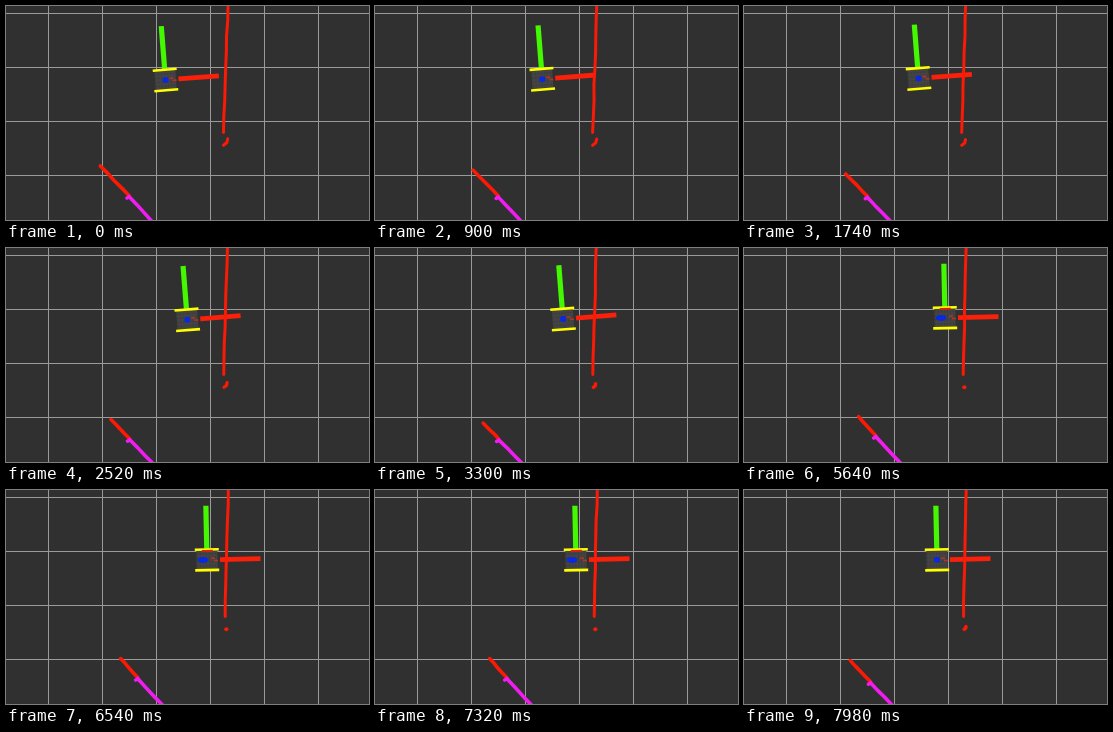
Write an HTML page that moves like this. It is 363 px wide and 214 px high and loops after 8 s.

```html
<!DOCTYPE html>
<html lang="en">
<head>
<meta charset="utf-8">
<title>Robot and laser scan</title>
<style>
html, body { margin: 0; width: 100%; height: 100%; overflow: hidden; background: #303030; }
svg { display: block; width: 100vw; height: 100vh; }
</style>
</head>
<body>
<svg viewBox="0 0 363 214" fill="none" stroke-linecap="round" stroke-linejoin="round">
  <rect width="363" height="214" fill="#303030"/>
  <path id="grid" stroke="#9a9a9a" stroke-linecap="butt" shape-rendering="crispEdges"/>
  <g id="robot" stroke-linecap="butt">
    <rect x="-10.5" y="-9.5" width="21" height="19" fill="#434343"/>
    <path d="M-10-6H10M-10-2H10M-10 2H10M-10 6H10" stroke="#343434" stroke-dasharray="1 2"/>
    <path d="M0-11V-54" stroke="#43f800" stroke-width="5.2"/>
    <path d="M13 0H53.5" stroke="#fa200a" stroke-width="4.8"/>
    <path d="M-12-10.3H12M-12 10.3H12" stroke="#ffff00" stroke-width="2.6"/>
    <path d="M4-1.5H8M7 1H11" stroke="#b03428" stroke-width="1.6"/>
    <path id="hit" d="M-5-9H6" stroke="#d82010" stroke-width="2"/>
    <ellipse id="dot" fill="#0a28e0"/>
  </g>
  <g stroke="#fa1a05">
    <path id="wall" stroke-width="3"/>
    <path id="post" stroke-width="4"/>
    <path id="near" stroke-width="3.6"/>
  </g>
  <path id="far" stroke="#f01cf0" stroke-width="3.6"/>
</svg>
<script>
const LOOP = 8000, STEP = 60;
const el = id => document.getElementById(id);
const put = (id, attrs) => { for (const k in attrs) el(id).setAttribute(k, attrs[k]); };
const ramp = (t, from, to) => Math.min(1, Math.max(0, (t - from) / (to - from)));
const ease = u => u * u * (3 - 2 * u);

function noise(n) {
  const s = Math.sin(n * 12.9898) * 43758.5453;
  return s - Math.floor(s) - 0.5;
}

// A scanned line, slightly rough across its run
function rough(x0, y0, x1, y1, seed, parts) {
  let d = `M${x0} ${y0}`;
  for (let i = 1; i < parts; i++) {
    const u = i / parts;
    d += `L${x0 + (x1 - x0) * u + noise(seed + i) * 0.8} ${y0 + (y1 - y0) * u}`;
  }
  return d + `L${x1} ${y1}`;
}

function draw(now) {
  const t = Math.floor((now % LOOP) / STEP) * STEP;
  const seed = Math.floor(t / 120);

  // Drive towards the wall, turn square to it, then back away
  const go = ramp(t, 0, 4800);
  const turn = ease(ramp(t, 4800, 5160));
  const back = ramp(t, 7380, 7980) ** 1.4;
  const held = turn - back;

  const x = 159.5 + 41.5 * go - 8 * back;
  const y = 74 - 4.2 * go;
  put('robot', { transform: `translate(${x} ${y}) rotate(${-4.5 + 3.3 * turn})` });
  put('dot', { cx: -4 * held, rx: 3 + 2.4 * held, ry: 3 });
  put('hit', { opacity: held });

  // Wall ahead; its corner post slips out of view as the robot nears
  const foot = 217.5 + 0.5 * go + 1.2 * turn + 0.4 * back;
  const corner = 1 - go * go + 0.4 * back;
  put('wall', { d: rough(222 - go + 1.3 * turn, -2, foot, 126.5, seed, 8) });
  put('post', {
    d: `M${foot + 1 - corner} 139.3l${3 * corner + 0.2} ${-2.5 * corner}l${corner} ${-4 * corner}`,
    'stroke-width': 4 - corner
  });

  // Side scan: red up to the joint, magenta beyond
  const jx = 123 + go + 7.7 * turn - 5.2 * back;
  const jy = 190.5 + 2 * go - 4 * turn + 4.2 * back;
  const sx = 94.3 + 20.3 * go - 8.3 * back;
  const sy = 160 + 22 * go - 13.4 * turn + 2 * back;
  put('near', { d: rough(sx, sy, jx, jy - 1, seed, 4) });
  put('far', {
    d: `M${jx - 2} ${jy + 1.5}l1-.5` + rough(jx, jy, 145.5 + 2 * go + 9 * turn - 8.5 * back, 215, seed + 9, 3)
  });
}

let grid = '';
for (let x = 42.5; x < 363; x += 54) grid += `M${x} 0V214`;
for (let y = 7.5; y < 214; y += 54) grid += `M0 ${y}H363`;
put('grid', { d: grid });

const start = performance.now();
function tick() {
  draw(performance.now() - start);
  requestAnimationFrame(tick);
}
tick();
</script>
</body>
</html>
```
